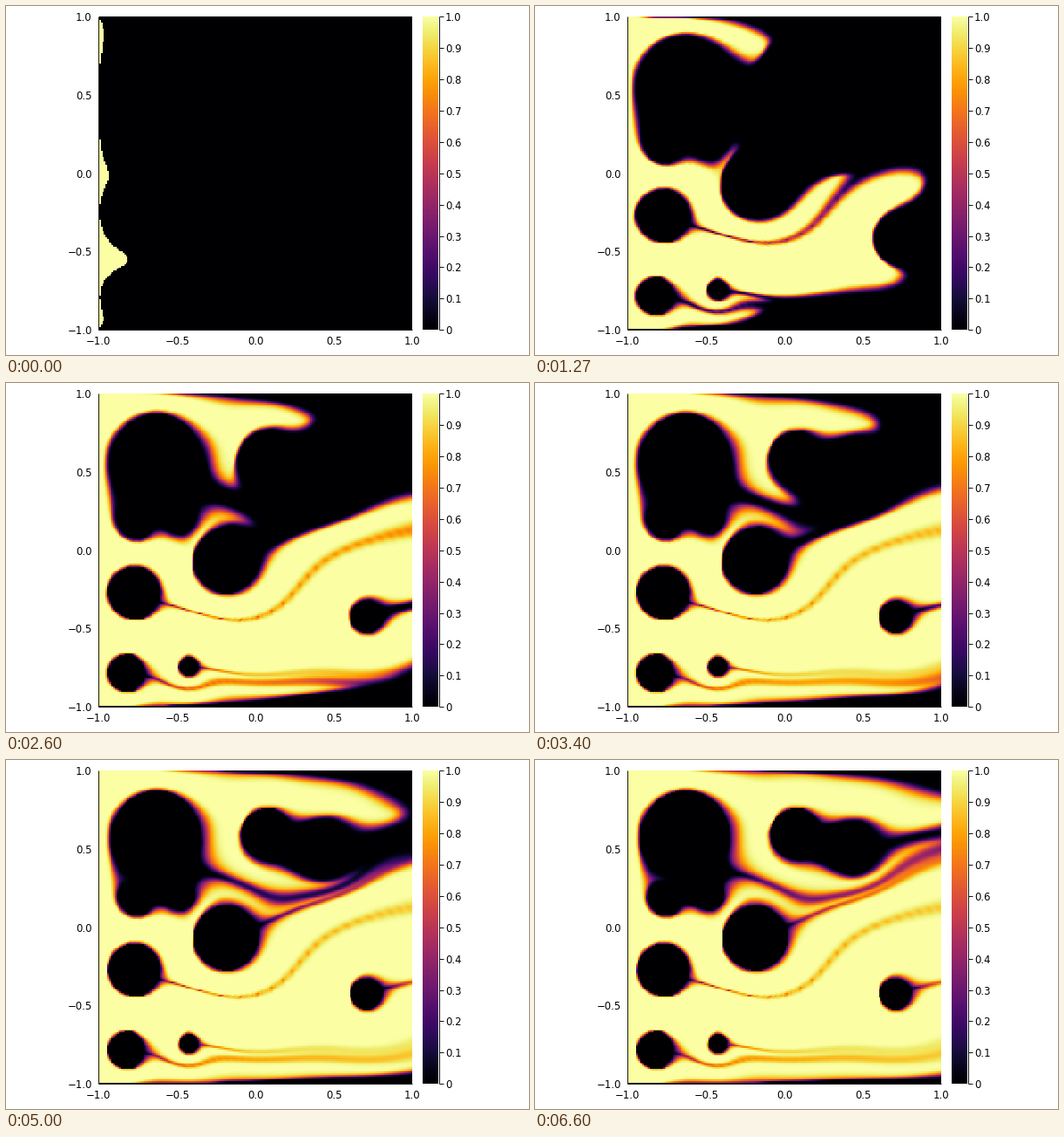
Animation, 600 px wide and 400 px high, one loop 6670 ms. Source, as a matplotlib script:

```python
"""Dye carried by slow viscous flow through a channel with round obstacles."""
import numpy as np
import matplotlib.pyplot as plt
from matplotlib.animation import FuncAnimation

FRAMES, LOOP_MS = 100, 6670
W, H = 600, 400
LEFT, RIGHT, TOP, BOTTOM = 106.4, 466.4, 11.8, 371.4

# x, y, radius
CIRCLES = [
    (-0.771, -0.273, 0.172), (-0.822, -0.782, 0.123), (-0.425, -0.742, 0.068),
    (-0.189, -0.071, 0.211), (0.708, -0.427, 0.107), (-0.632, 0.580, 0.288),
    (-0.755, 0.178, 0.117), (-0.480, 0.200, 0.104), (0.075, 0.588, 0.166),
    (0.447, 0.504, 0.161),
]

NY, NX = 200, 360          # flow grid, longer than the visible part
STEP = 2 / NY
DRAG = 1e3                 # resistance inside the obstacles
CELLS = 200                # dye grid


def solid(x, y):
    return np.any([(x - a) ** 2 + (y - b) ** 2 < r * r for a, b, r in CIRCLES], axis=0)


def solve_flow():
    """Stokes flow from the stream function, by block elimination over column pairs."""
    m = NY - 1
    x = (np.arange(NX) - (NX - 1) / 2) * STEP
    y = np.linspace(-1, 1, NY + 1)
    base = 1.5 * (y - y ** 3 / 3)
    ku = DRAG * solid(x[:, None], y[None, :-1] + STEP / 2)
    kv = DRAG * solid(x[:, None] + STEP / 2, y[None, 1:-1])

    eye = np.eye(m)
    lap = np.eye(m, k=1) + np.eye(m, k=-1) - 4 * eye
    bih = lap @ lap + 2 * eye
    bih[0, 0] += 2
    bih[-1, -1] += 2
    diff = np.eye(m + 1, m) - np.eye(m + 1, m, k=-1)

    def own(i):
        return bih + diff.T @ (ku[i][:, None] * diff) + np.diag(kv[i - 1] + kv[i])

    def link(i):
        return 2 * lap - np.diag(kv[i])

    def load(i):
        return -diff.T @ (ku[i] * np.diff(base))

    done, couple = [], None
    for k in range(0, NX, 2):
        block = np.block([[own(k), link(k)], [link(k), own(k + 1)]])
        rhs = np.concatenate([load(k), load(k + 1)])
        if done:
            block -= couple.T @ done[-1][:, :-1]
            rhs -= couple.T @ done[-1][:, -1]
        couple = np.block([[eye, 0 * eye], [link(k + 1), eye]])
        done.append(np.linalg.solve(block, np.column_stack([couple, rhs])))

    part, rows = np.zeros(2 * m), []
    for sol in reversed(done):
        part = sol[:, -1] - sol[:, :-1] @ part
        rows.append(part.reshape(2, m))
    psi = np.tile(base, (NX, 1))
    psi[:, 1:-1] += np.concatenate(rows[::-1])

    flow = np.gradient(psi, STEP, axis=1) - 1j * np.gradient(psi, STEP, axis=0)
    flow[:, [0, -1]] = 0
    flow[solid(x[:, None], y[None, :])] = 0
    return flow, x[0]


def sample(field, z, x0, h):
    """Bilinear lookup at complex positions z."""
    fx = np.clip((z.real - x0) / h, 0, field.shape[0] - 1.001)
    fy = np.clip((z.imag + 1) / h, 0, field.shape[1] - 1.001)
    i, j = fx.astype(int), fy.astype(int)
    a, b = fx - i, fy - j
    return ((1 - a) * ((1 - b) * field[i, j] + b * field[i, j + 1])
            + a * ((1 - b) * field[i + 1, j] + b * field[i + 1, j + 1]))


flow, flow_x0 = solve_flow()


def move(z, dt):
    mid = z + dt / 2 * sample(flow, z, flow_x0, STEP)
    return z + dt * sample(flow, mid, flow_x0, STEP)


def frame_time():
    """The fastest dye reaches x = 0.44 in thirteen frames."""
    z, t, dt = -1 + 1j * np.linspace(-0.7, -0.4, 31), 0.0, 3e-4
    while z.real.max() < 0.44 and t < 2:
        z, t = move(z, dt), t + dt
    return t / 13


def dye_history():
    axis = np.linspace(-1, 1, CELLS)
    h = axis[1] - axis[0]
    z = axis[:, None] + 1j * axis[None, :]
    dt, parts = frame_time(), 40
    for _ in range(parts):
        z = move(z, -dt / parts)
    fresh = z.real < -1
    dye, out = np.zeros((CELLS, CELLS)), []
    for _ in range(FRAMES):
        dye = np.where(fresh, 1.0, sample(dye, z, -1, h))
        out.append(dye.T)
    return out, 1 + h / 2


history, edge = dye_history()

fig = plt.figure(figsize=(W / 100, H / 100), dpi=100, facecolor="white")


def add_axes(x0, x1):
    ax = fig.add_axes([x0 / W, 1 - BOTTOM / H, (x1 - x0) / W, (BOTTOM - TOP) / H])
    ax.axis("off")
    return ax


ax = add_axes(LEFT, RIGHT)
image = ax.imshow(history[0], cmap="inferno", vmin=0, vmax=1, origin="lower",
                  extent=(-edge, edge, -edge, edge), interpolation="nearest", aspect="auto")
ax.set(xlim=(-1, 1), ylim=(-1, 1))

bar = add_axes(478.4, 496.4)
bar.imshow(np.linspace(0, 1, 256)[:, None], cmap="inferno", origin="lower",
           interpolation="nearest", aspect="auto")

page = fig.add_axes([0, 0, 1, 1])
page.set(xlim=(0, W), ylim=(H, 0))
page.axis("off")


def line(xs, ys):
    page.plot(xs, ys, color="black", lw=0.65, solid_capstyle="butt")


def label(x, y, text, ha):
    page.text(x, y, text, ha=ha, va="center_baseline", color="black",
              family="DejaVu Sans", size=11.6 * 0.72)


line([LEFT, LEFT], [TOP, BOTTOM])
line([LEFT, RIGHT], [BOTTOM, BOTTOM])
for v in np.linspace(-1, 1, 5):
    text = f"{v:.1f}".replace("-", "\u2212")
    label(LEFT + 180 * (v + 1), 383, text, "center")
    label(98.7, BOTTOM - 179.8 * (v + 1), text, "right")

line([496.6, 496.6], [TOP, BOTTOM])
for k in range(11):
    y = BOTTOM - 35.96 * k
    line([496.6, 502.2], [y, y])
    label(504, y, f"{k / 10:.1f}" if k else "0", "left")


def draw(n):
    image.set_data(history[n])
    return [image]


anim = FuncAnimation(fig, draw, frames=FRAMES, interval=LOOP_MS / FRAMES,
                     repeat=True, repeat_delay=0, blit=False)
plt.show()
```
